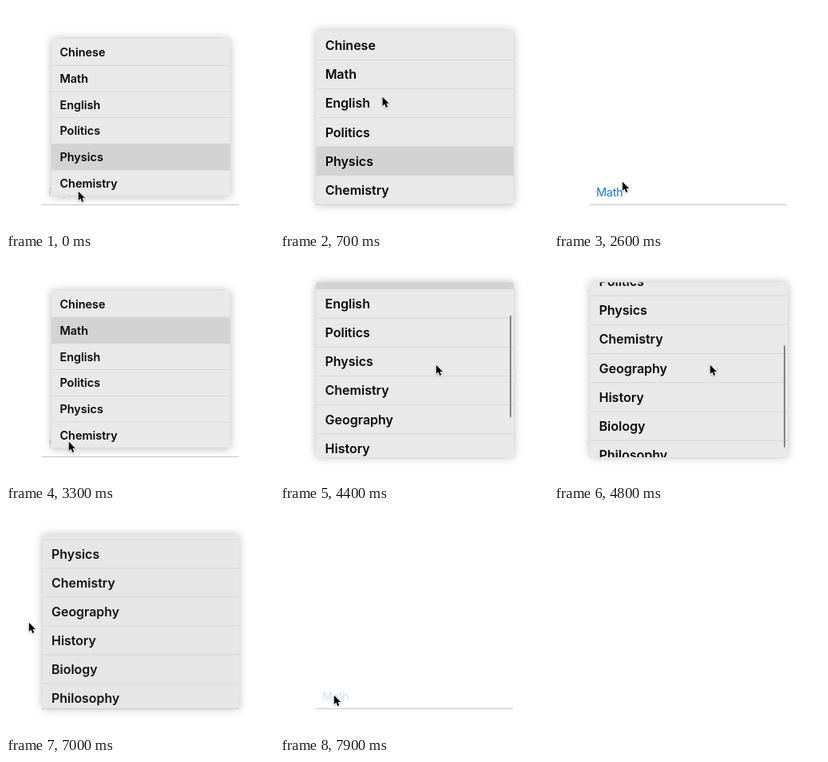
Animation, 336 px wide and 280 px high, one loop 8000 ms. Source, as an HTML page with a canvas:

```html
<!DOCTYPE html>
<html lang="en">
<head>
<meta charset="utf-8">
<title>Subject picker</title>
<style>
  html, body { margin: 0; width: 100%; height: 100%; overflow: hidden; background: #fff; }
  canvas { display: block; width: 336px; height: 280px; }
</style>
</head>
<body>
<canvas id="stage"></canvas>
<script>
const W = 336, H = 280, LOOP = 8000, STEP = 100;
const SUBJECTS = ['Chinese', 'Math', 'English', 'Politics', 'Physics',
  'Chemistry', 'Geography', 'History', 'Biology', 'Philosophy'];
const MENU = { x: 45, y: 30.5, w: 248, h: 218.5, row: 36.2 };
const MAX_SCROLL = 139.5;

// Pointer stops: time, x, y
const PATH = [
  [0, 90, 231], [200, 94, 218], [900, 136, 87], [1000, 135, 84],
  [1600, 135, 84], [2400, 90, 200], [2600, 85, 219], [2700, 78, 229],
  [3300, 78, 229], [4000, 195, 133], [5250, 195, 133], [5800, 152, 179],
  [6100, 30, 57], [6400, 126, 190], [6700, 28, 140], [7000, 28, 140],
  [7800, 67, 231], [8000, 67, 231]
];

const canvas = document.getElementById('stage');
const ctx = canvas.getContext('2d');
const dpr = window.devicePixelRatio || 1;
canvas.width = W * dpr;
canvas.height = H * dpr;

const clamp = v => Math.max(0, Math.min(1, v));
const ramp = (t, from, to) => clamp((t - from) / (to - from));
const smooth = p => p * p * (3 - 2 * p);
const easeOut = p => 1 - (1 - p) * (1 - p);

function pointerAt(t) {
  let i = 0;
  while (i < PATH.length - 2 && t >= PATH[i + 1][0]) i++;
  const [t0, x0, y0] = PATH[i], [t1, x1, y1] = PATH[i + 1];
  const p = smooth(ramp(t, t0, t1));
  return [x0 + (x1 - x0) * p, y0 + (y1 - y0) * p];
}

// Scale and opacity of the popup for one open/close cycle
function popup(t, open, close) {
  const age = t - open;
  if (age <= 0 || t > close + 400) return null;
  const out = ramp(t, close, close + 400);
  return {
    scale: 1 - 0.25 * Math.exp(-age / 158) - 0.12 * smooth(out),
    alpha: clamp(age / 130) * (1 - smooth(out))
  };
}

function drawField(label, alpha) {
  ctx.fillStyle = '#c6c6c6';
  ctx.fillRect(45, 248, 247, 1);
  ctx.globalAlpha = alpha;
  ctx.fillStyle = '#1478d4';
  ctx.font = '400 14.5px Inter, sans-serif';
  ctx.letterSpacing = '-0.3px';
  ctx.fillText(label, 53, 237.5);
  ctx.letterSpacing = '0px';
  ctx.globalAlpha = 1;
}

function drawMenu({ scale, alpha }, selected, scroll, barAlpha) {
  const { x, y, w, h, row } = MENU;
  const cx = x + w / 2, cy = y + h / 2;
  ctx.save();
  ctx.translate(cx, cy);
  ctx.scale(scale, scale);
  ctx.translate(-cx, -cy);
  ctx.globalAlpha = alpha;

  ctx.beginPath();
  ctx.roundRect(x, y, w, h, 2);
  ctx.shadowColor = 'rgba(0,0,0,0.27)';
  ctx.shadowBlur = 12 * dpr;
  ctx.fillStyle = '#e9e9e9';
  ctx.fill();
  ctx.shadowColor = 'transparent';
  ctx.clip();

  ctx.font = '600 16px Inter, sans-serif';
  SUBJECTS.forEach((name, i) => {
    const top = y + 0.5 + i * row - scroll;
    if (i === selected) {
      ctx.fillStyle = '#d3d3d3';
      ctx.fillRect(x, top, w, row);
    }
    ctx.fillStyle = '#d6d6d6';
    ctx.fillRect(x, top + row - 0.5, w, 1);
    ctx.fillStyle = '#080808';
    ctx.fillText(name, x + 11.5, top + 24);
  });

  if (barAlpha > 0) {
    const ratio = 0.585;
    ctx.globalAlpha = alpha * barAlpha;
    ctx.fillStyle = '#858585';
    ctx.beginPath();
    ctx.roundRect(x + 243, y + 3.5 + scroll * ratio, 2, 127.5, 1);
    ctx.fill();
  }
  ctx.restore();
}

function drawPointer(x, y) {
  ctx.save();
  ctx.translate(x, y);
  ctx.beginPath();
  ctx.moveTo(0.8, 0.8);
  ctx.lineTo(0.8, 12);
  ctx.lineTo(3.4, 9.6);
  ctx.lineTo(5.3, 14);
  ctx.lineTo(7.3, 13.1);
  ctx.lineTo(5.5, 8.9);
  ctx.lineTo(9, 8.9);
  ctx.closePath();
  ctx.lineJoin = 'round';
  ctx.lineWidth = 1.8;
  ctx.strokeStyle = '#fff';
  ctx.shadowColor = 'rgba(0,0,0,0.3)';
  ctx.shadowBlur = 2 * dpr;
  ctx.shadowOffsetY = 0.7 * dpr;
  ctx.stroke();
  ctx.shadowColor = 'transparent';
  ctx.fillStyle = '#000';
  ctx.fill();
  ctx.restore();
}

function draw(t) {
  ctx.setTransform(dpr, 0, 0, dpr, 0, 0);
  ctx.fillStyle = '#fff';
  ctx.fillRect(0, 0, W, H);

  const selected = t < 1600 ? 4 : 1;
  const pressed = t < 400 || (t >= 3000 && t < 3600) || t >= 7900;
  drawField(SUBJECTS[selected], pressed ? 0.2 : 1);

  const state = t < 2500 ? popup(t, -150, 1600) : popup(t, 3150, 6950);
  if (state) {
    const scroll = MAX_SCROLL * easeOut(ramp(t, 4165, 5045));
    const bar = ramp(t, 4150, 4250) * (1 - ramp(t, 5250, 5600));
    drawMenu(state, selected, scroll, bar);
  }
  drawPointer(...pointerAt(t));
}

const start = performance.now();
function tick() {
  const t = (performance.now() - start) % LOOP;
  draw(Math.floor(t / STEP) * STEP);
  requestAnimationFrame(tick);
}
tick();
</script>
</body>
</html>
```
